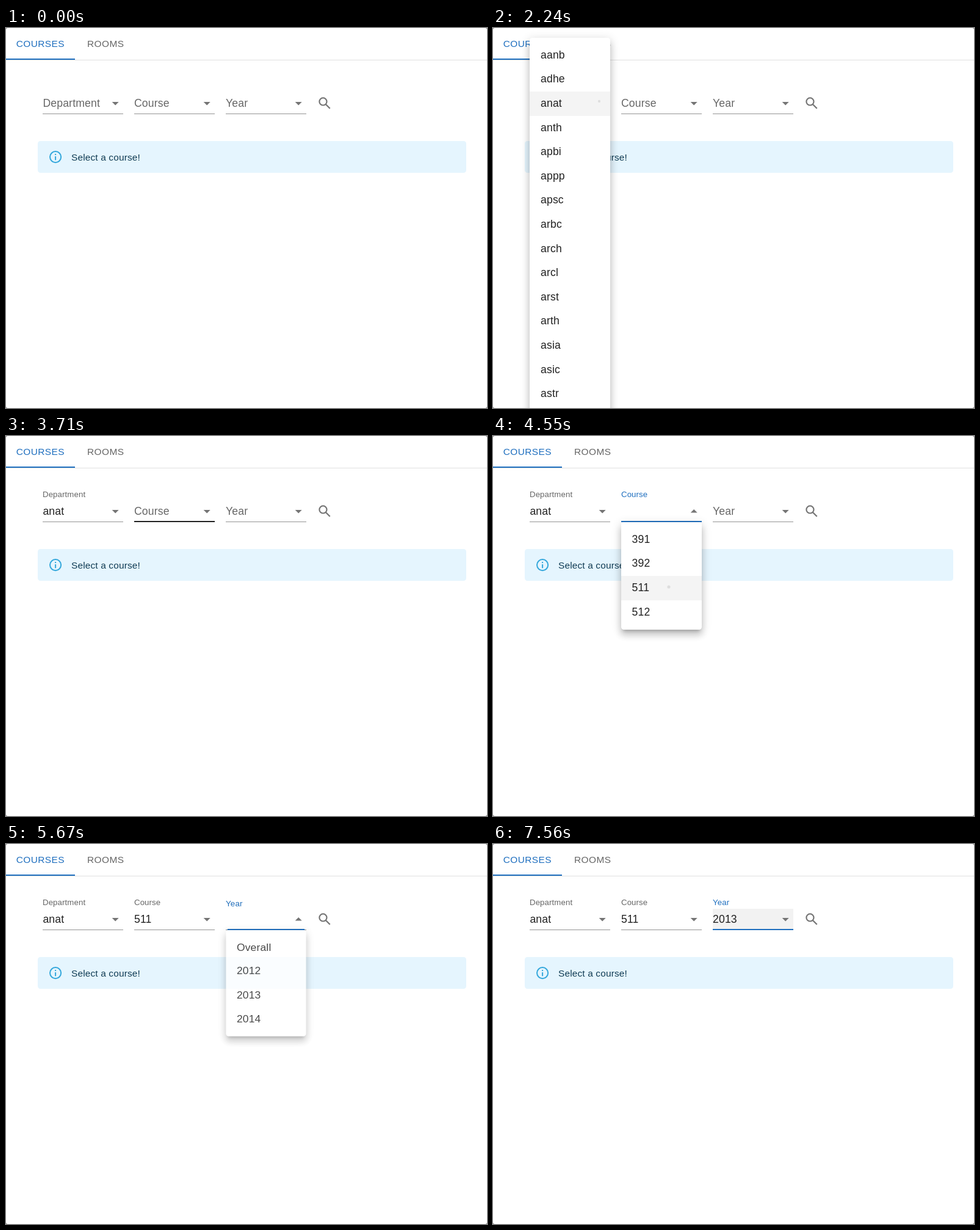
Recreate the animation shown at these times as an HTML page. Size 788 by 622 pixels, loop 7630 ms.

```html
<!DOCTYPE html>
<html lang="en">
<head>
<meta charset="utf-8">
<title>Course picker</title>
<style>
  html, body { margin: 0; width: 100%; height: 100%; overflow: hidden; background: #888; }
  body { font: 17.6px/20px "Liberation Sans", Arial, sans-serif; letter-spacing: .00938em; color: rgba(0,0,0,.87); }
  #stage { position: relative; width: 788px; height: 622px; overflow: hidden; background: #fff; border-radius: 3px; --blue: #1f6fbf; }
  #stage div, svg { position: absolute; white-space: nowrap; }
  .tab { top: 16px; font-size: 15.4px; letter-spacing: .02857em; color: #666; }
  #tabline { top: 52px; width: 100%; height: 1px; background: #e0e0e0; }
  #indicator { top: 49.6px; width: 113.4px; height: 2.4px; background: var(--blue); }
  #alert { left: 52px; top: 185px; width: 702px; height: 52.4px; border-radius: 4.4px; background: #e5f5fe; }
  #alert div { left: 55px; top: 17px; font-size: 15.4px; letter-spacing: .01071em; color: #0f3b52; }
  .field { top: 106px; width: 132px; height: 35px; }
  .label, .value { top: 7px; }
  .label { transform-origin: 0 50%; }
  .line, .focus { bottom: 0; width: 100%; }
  .focus { height: 2px; background: var(--blue); }
  .arrow { left: 105.6px; top: 4px; }
  .menu { width: 132px; border-radius: 4.4px; overflow: hidden; background: #fff;
    box-shadow: 0 5.5px 5.5px -3.3px rgba(0,0,0,.2), 0 8.8px 11px 1px rgba(0,0,0,.14), 0 3.3px 15.4px 2.2px rgba(0,0,0,.12); }
  .item { width: 100%; height: 39.6px; line-height: 39.6px; text-indent: 17.6px; overflow: hidden; }
  .ripple { border-radius: 50%; background: rgba(0,0,0,.87); }
</style>
</head>
<body>
<div id="stage">
  <div class="tab" style="left:16.8px;color:var(--blue)">COURSES</div>
  <div class="tab" style="left:133px">ROOMS</div>
  <div id="tabline"></div>
  <div id="indicator"></div>
  <svg style="left:509.2px;top:110.4px" width="26.4" height="26.4" viewBox="0 0 24 24" fill="none" stroke="#757575" stroke-width="2">
    <circle cx="9.5" cy="9.5" r="5.5"/><path d="M13.6 13.6L19.75 19.75" stroke-width="2.1"/>
  </svg>
  <div id="alert">
    <svg style="left:17.4px;top:14.2px" width="24.2" height="24.2" viewBox="0 0 24 24" fill="none" stroke="#35a8dc" stroke-width="2">
      <circle cx="12" cy="12" r="9"/><path d="M12 7v2M12 11v6"/>
    </svg>
    <div>Select a course!</div>
  </div>
</div>
<script>
const LOOP = 7630, STEP = 70, ITEM = 39.6, ANCHOR = 141;
const stage = document.getElementById('stage');

// Times in ms; hovers are [item, from, to]; press is the ripple centre inside the picked item.
const fields = [
  { x: 60.4, name: 'Department', pick: 2, top: 16, height: 632.5, duration: 383,
    items: 'aanb adhe anat anth apbi appp apsc arbc arch arcl arst arth asia asic astr astu',
    hover: 510, open: 1790, press: 2193, close: 2900, blur: 3460,
    hovers: [[2, 1790, LOOP]], at: [113.4, 16], radius: 117 },
  { x: 210, name: 'Course', pick: 2, top: ANCHOR, height: 176, duration: 272,
    items: '391 392 511 512',
    hover: 3400, open: 3770, press: 4490, close: 4690, blur: 5290,
    hovers: [[1, 4170, 4270], [2, 4270, LOOP]], at: [78, 18], radius: 82 },
  { x: 360, name: 'Year', pick: 2, top: ANCHOR, height: 176, duration: 272,
    items: 'Overall 2012 2013 2014',
    hover: 5215, open: 5525, press: 6585, close: 6715, blur: LOOP,
    hovers: [[1, 5700, 5900], [2, 5900, LOOP]], at: [78.5, 18], radius: 82 },
];

// cubic-bezier(x1, 0, .2, 1)
function bezier(u, x1) {
  if (u <= 0) return 0;
  if (u >= 1) return 1;
  let lo = 0, hi = 1, s;
  for (let i = 0; i < 24; i++) {
    s = (lo + hi) / 2;
    const x = 3 * (1 - s) * s * ((1 - s) * x1 + s * .2) + s ** 3;
    if (x < u) lo = s; else hi = s;
  }
  return s * s * (3 - 2 * s);
}
const ease = (t, start, duration) => bezier((t - start) / duration, .4);
const easeOut = (t, start, duration) => bezier((t - start) / duration, 0);

function add(parent, className, text = '', style = {}) {
  const el = document.createElement('div');
  el.className = className;
  el.textContent = text;
  Object.assign(el.style, style);
  return parent.appendChild(el);
}

for (const f of fields) {
  const names = f.items.split(' ');
  f.box = add(stage, 'field', '', { left: f.x + 'px' });
  f.line = add(f.box, 'line');
  f.focus = add(f.box, 'focus');
  f.label = add(f.box, 'label', f.name);
  f.value = add(f.box, 'value', names[f.pick]);
  f.arrow = add(f.box, 'arrow');
  f.arrow.innerHTML = '<svg width="26.4" height="26.4" viewBox="0 0 24 24" fill="#757575"><path d="M7 10l5 5 5-5z"/></svg>';
  Object.assign(f.arrow.style, { width: '26.4px', height: '26.4px' });
}
for (const f of fields) {
  const firstTop = 8.8;
  f.menu = add(stage, 'menu', '', {
    left: f.x + 'px', top: f.top + 'px', height: f.height + 'px',
    transformOrigin: `66px ${ANCHOR - f.top}px`,
  });
  f.rows = f.items.split(' ').map((name, i) =>
    add(f.menu, 'item', name, { top: firstTop + i * ITEM + 'px' }));
  f.ripple = add(f.rows[f.pick], 'ripple', '', {
    left: f.at[0] - f.radius + 'px', top: f.at[1] - f.radius + 'px',
    width: 2 * f.radius + 'px', height: 2 * f.radius + 'px',
  });
}

function drawField(f, t) {
  const isOpen = t >= f.open && t < f.close;
  const hovered = t >= f.hover && t < f.open;
  const shrink = easeOut(t, f.open, 200);
  const focus = shrink - easeOut(t, f.blur, 200);
  const dark = hovered ? .42 + .45 * ease(t, f.hover, 200) : .42;

  f.box.style.background = t >= f.close && t < f.blur ? '#f2f2f2' : 'none';
  f.line.style.height = hovered ? '2px' : '1px';
  f.line.style.background = `rgba(0,0,0,${dark})`;
  f.focus.style.transform = `scaleX(${focus})`;
  f.label.style.transform = `translateY(${-27.2 * shrink}px) scale(${1 - .25 * shrink})`;
  f.label.style.color = `color-mix(in srgb, var(--blue) ${focus * 100}%, #666)`;
  f.value.style.visibility = t >= f.close ? 'visible' : 'hidden';
  f.arrow.style.transform = isOpen ? 'rotate(180deg)' : 'none';
}

function menuScale(f, t) {
  const grow = f.duration * .666, delay = f.duration * .333;
  if (t < f.close) return .75 + .25 * ease(t, f.open, grow);
  // The closing menu snaps small during the delay, then shrinks from full size.
  return t < f.close + delay ? .75 : 1 - .25 * ease(t, f.close + delay, grow);
}

function drawMenu(f, t) {
  const opacity = ease(t, f.open, f.duration) - ease(t, f.close, f.duration);
  f.menu.style.display = opacity > 0 ? 'block' : 'none';
  if (opacity <= 0) return;
  const s = menuScale(f, t);
  f.menu.style.opacity = opacity;
  f.menu.style.transform = s === 1 ? 'none' : `scale(${s}, ${s * s})`;

  f.rows.forEach(row => row.style.background = 'none');
  for (const [i, from, to] of f.hovers) {
    const alpha = .045 * (ease(t, from, 150) - ease(t, to, 150));
    f.rows[i].style.background = `rgba(0,0,0,${alpha})`;
  }
  if (t >= f.close) f.rows[f.pick].style.background = 'rgba(25,118,210,.12)';

  const spread = ease(t, f.press, 550);
  f.ripple.style.transform = `scale(${spread})`;
  f.ripple.style.opacity = (.1 + .2 * spread) * (1 - ease(t, f.close, 550));
}

function render(now) {
  const t = Math.floor((now % LOOP) / STEP) * STEP;
  for (const f of fields) {
    drawField(f, t);
    drawMenu(f, t);
  }
}

const start = performance.now();
function tick() {
  render(performance.now() - start);
  requestAnimationFrame(tick);
}
tick();
</script>
</body>
</html>
```
